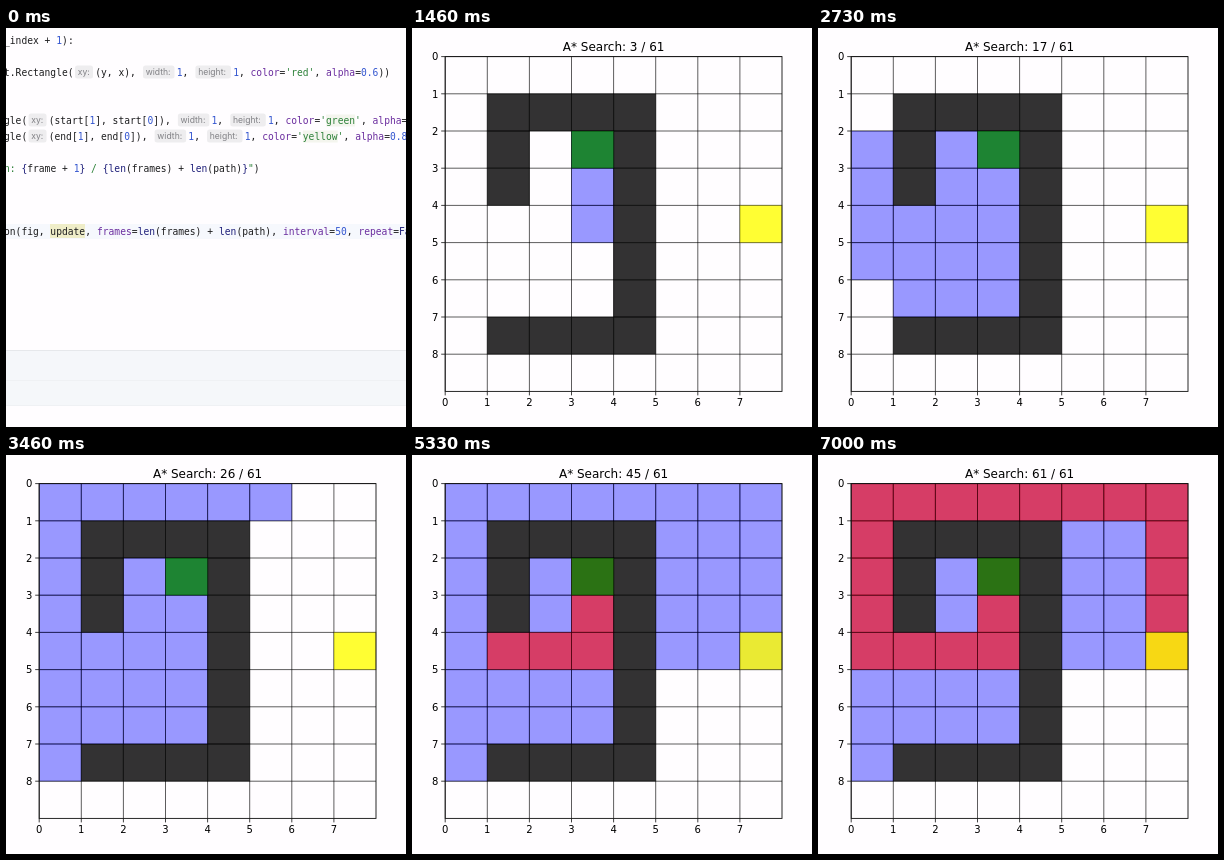
Recreate the animation shown at these times as an HTML page. Size 400x399 px, loop 7.33 s.

```html
<!DOCTYPE html>
<html lang="en">
<head>
<meta charset="utf-8">
<title>A* Search</title>
<style>
  html, body { margin: 0; width: 100%; height: 100%; overflow: hidden; background: #fffdff; }
  svg { display: block; width: 100%; height: 100%; }
  .code { font: 9.65px "DejaVu Sans Mono", monospace; white-space: pre; }
  .hint { font: 8.6px Inter, sans-serif; fill: #808085; }
  .axis { font: 10px "DejaVu Sans", sans-serif; }
  .title { font: 12px "DejaVu Sans", sans-serif; text-anchor: middle; }
</style>
</head>
<body>
<svg id="stage" viewBox="0 0 400 399">
  <g id="editor">
    <rect width="400" height="399" fill="#fffdff"/>
    <rect y="196" width="400" height="15" fill="#f6f8fd"/>
    <rect x="44" y="196" width="35" height="14" fill="#efedc8"/>
    <rect y="322" width="400" height="56" fill="#f5f7fa"/>
    <path d="M0 322.5H400" stroke="#e6e8eb"/>
    <path d="M0 352.5H400M0 377.5H400" stroke="#eff1f4"/>
  </g>
  <rect id="blank" width="400" height="399" fill="#fffdff"/>
  <g id="plot">
    <rect width="400" height="399" fill="#fffdff"/>
  </g>
</svg>
<script>
const $ = id => document.getElementById(id);
const editor = $('editor'), plot = $('plot'), blank = $('blank');

function add(parent, tag, attrs, text) {
  const el = document.createElementNS('http://www.w3.org/2000/svg', tag);
  for (const k in attrs) el.setAttribute(k, attrs[k]);
  if (text !== undefined) el.textContent = text;
  parent.appendChild(el);
  return el;
}

// --- Editor ---
const CHAR = 5.81;
const INK = { k: '#1c1c1e', p: '#6a2c9e', n: '#3557d0', s: '#2c8038', b: '#1c1c78' };
const HINT = { 'xy:': 21.5, 'width:': 35, 'height:': 39 };

// Tokens are "kind|text"; kind h is an inline parameter hint.
function codeLine(base, x, ...tokens) {
  for (const token of tokens) {
    const kind = token[0], text = token.slice(2);
    if (kind === 'h') {
      const w = HINT[text];
      add(editor, 'rect', { x: x + 1.3, y: base - 10, width: w - 3.5, height: 13, rx: 2.5, fill: '#eeedef' });
      add(editor, 'text', { x: x + 4, y: base - 0.7, class: 'hint' }, text);
      x += w;
      continue;
    }
    if (text === "'green'" || text === "'yellow'")
      add(editor, 'rect', { x: x + CHAR, y: base - 9, width: (text.length - 2) * CHAR, height: 12, fill: '#f4f5ee' });
    add(editor, 'text', { x, y: base, class: 'code', fill: INK[kind] }, text);
    x += text.length * CHAR;
  }
}

const size = ['h|width:', 'n|1', 'k|, ', 'h|height:', 'n|1', 'k|, '];
const look = (color, alpha) => ['p|color', 'k|=', `s|'${color}'`, 'k|, ', 'p|alpha', 'k|=', 'n|' + alpha];
const lens = ['b|len', 'k|(frames) + ', 'b|len', 'k|(path)'];

codeLine(15.5, -2, 'k|_index + ', 'n|1', 'k|):');
codeLine(47.5, -2, 'k|t.Rectangle(', 'h|xy:', 'k|(y, x), ', ...size, ...look('red', '0.6'), 'k|))');
codeLine(95.5, -2, 'k|gle(', 'h|xy:', 'k|(start[', 'n|1', 'k|], start[', 'n|0', 'k|]), ', ...size, ...look('green', '0.8'));
codeLine(111.5, -2, 'k|gle(', 'h|xy:', 'k|(end[', 'n|1', 'k|], end[', 'n|0', 'k|]), ', ...size, ...look('yellow', '0.8'));
codeLine(143.5, -2, 's|n: ', 'b|{', 'k|frame + ', 'n|1', 'b|}', 's| / ', 'b|{', ...lens, 'b|}', 's|"', 'k|)');
codeLine(207, -2, 'k|on(fig, update, ', 'p|frames', 'k|=', ...lens, 'k|, ',
  'p|interval', 'k|=', 'n|50', 'k|, ', 'p|repeat', 'k|=', 'b|False', 'k|)');

// --- Search ---
const ROWS = 9, COLS = 8, start = [2, 3], goal = [4, 7];
const maze = ['', '.####', '.#..#', '.#..#', '....#', '....#', '....#', '.####', ''];
const isWall = (r, c) => maze[r][c] === '#';

function search() {
  const key = ([r, c]) => r * COLS + c;
  const open = [{ pos: start, g: 0, f: 0 }];
  const best = { [key(start)]: 0 }, parent = {}, visited = [];
  while (open.length) {
    open.sort((a, b) => a.f - b.f || key(a.pos) - key(b.pos));
    const { pos, g } = open.shift();
    visited.push(pos);
    if (key(pos) === key(goal)) break;
    for (const [dr, dc] of [[-1, 0], [1, 0], [0, -1], [0, 1]]) {
      const r = pos[0] + dr, c = pos[1] + dc, k = key([r, c]);
      if (r < 0 || c < 0 || r >= ROWS || c >= COLS || isWall(r, c) || best[k] <= g + 1) continue;
      best[k] = g + 1;
      parent[k] = pos;
      open.push({ pos: [r, c], g: g + 1, f: g + 1 + Math.abs(r - goal[0]) + Math.abs(c - goal[1]) });
    }
  }
  const path = [];
  for (let p = goal; p; p = parent[key(p)]) path.unshift(p);
  return { visited, path };
}

// --- Plot ---
const X = c => 33.2 + 42.1 * c;
const Y = r => 28.6 + 37.2 * r;
const frame = { x: X(0), y: Y(0), width: X(COLS) - X(0), height: Y(ROWS) - Y(0) };
const cell = (r, c, fill, alpha) => add(plot, 'rect', {
  x: X(c), y: Y(r), width: X(1) - X(0), height: Y(1) - Y(0), fill, 'fill-opacity': alpha,
  stroke: '#000', 'stroke-opacity': 0.28
});

let grid = '', ticks = '';
for (let c = 0; c < COLS; c++) {
  grid += `M${X(c)} ${Y(0)}V${Y(ROWS)}`;
  ticks += `M${X(c)} ${Y(ROWS)}v4`;
  add(plot, 'text', { x: X(c), y: 378.3, class: 'axis', 'text-anchor': 'middle' }, c);
}
for (let r = 0; r < ROWS; r++) {
  grid += `M${X(0)} ${Y(r)}H${X(COLS)}`;
  ticks += `M${X(0)} ${Y(r)}h-4`;
  add(plot, 'text', { x: 26.3, y: Y(r) + 3.7, class: 'axis', 'text-anchor': 'end' }, r);
}
add(plot, 'path', { d: grid, stroke: '#000', 'stroke-width': 0.8, 'stroke-opacity': 0.8, fill: 'none' });

const { visited, path } = search();
const steps = [
  ...visited.map(([r, c]) => cell(r, c, '#00f', 0.4)),
  ...path.map(([r, c]) => cell(r, c, '#f00', 0.6))
];
for (let r = 0; r < ROWS; r++)
  for (let c = 0; c < COLS; c++) if (isWall(r, c)) cell(r, c, '#000', 0.8);
cell(...start, '#008000', 0.8);
cell(...goal, '#ff0', 0.8);

add(plot, 'path', { d: ticks, stroke: '#111', 'stroke-width': 0.8 });
add(plot, 'rect', { ...frame, fill: 'none', stroke: '#111', 'stroke-width': 0.9 });
const title = add(plot, 'text', { x: 201.6, y: 22.5, class: 'title' });

// --- Timeline ---
const LOOP = 7330, TICK = 1000 / 15;
const pace = [[1260, 1], [1995, 9], [2060, 10], [2995, 20], [3450, 26], [4500, 38], [5300, 45], [6450, 57], [6870, 61]];

function stepAt(t) {
  const i = pace.findIndex(([time]) => time > t);
  if (i < 0) return steps.length;
  if (i === 0) return 0;
  const [t0, n0] = pace[i - 1], [t1, n1] = pace[i];
  return Math.floor(n0 + (n1 - n0) * (t - t0) / (t1 - t0));
}

function render(ms) {
  const tick = Math.floor((ms % LOOP + 7) / TICK);
  const n = stepAt(tick * TICK);
  blank.setAttribute('opacity', Math.min(1, Math.max(0, (tick - 12) / 4)));
  plot.style.display = n ? '' : 'none';
  steps.forEach((el, i) => { el.style.display = i < n ? '' : 'none'; });
  title.textContent = `A* Search: ${n} / ${steps.length}`;
}

const origin = performance.now();
function loop() {
  render(performance.now() - origin);
  requestAnimationFrame(loop);
}
loop();
</script>
</body>
</html>
```
